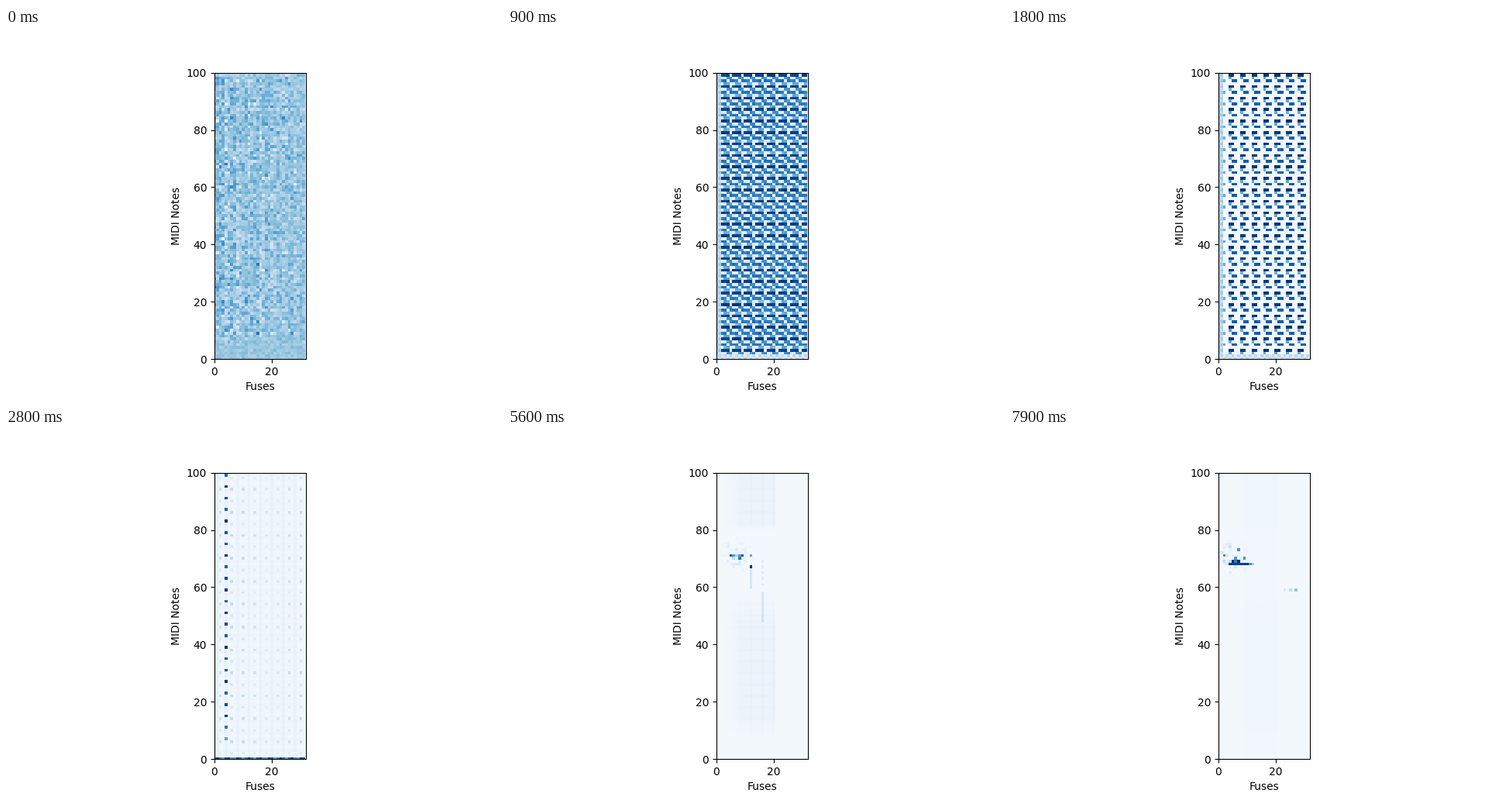
These frames come from a looping animation (640x480 px, 8000 ms). A matplotlib script:

```python
import numpy as np
import matplotlib.pyplot as plt
from matplotlib.animation import FuncAnimation

ROWS, COLS, FRAMES = 100, 32, 80
row, col = np.mgrid[0:ROWS, 0:COLS]
rng = np.random.default_rng(11)
grain = rng.normal(0, 1, (ROWS, COLS))
flecks = rng.uniform(0, 1, (ROWS, COLS))


def dash(r, start, width):
    """Dashes in every fourth row, repeating every four columns."""
    return (row % 4 == r) & ((col - start) % 4 < width)


def soften_edges(g, left):
    """Pale alternating cells along the left and bottom borders."""
    g[:, :2] = left + .06 * np.cos(np.pi * (row + col))[:, :2]
    g[:2] = .2 + .08 * np.cos(np.pi * (row + col))[:2]
    return g


def weave():
    saw = (col % 4 - 1.5) / 1.5
    slope = np.where(row % 4 == 1, .36, .07)
    g = .46 + slope * saw * (1.1 - .01 * col) + .07 * np.cos(np.pi * row)
    g += .15 * dash(3, 2, 1) - .15 * dash(2, 3, 1)
    g[:, :2] = .56
    return g + .03 * grain


def static(base):
    fade = np.clip(row / 10, .4, 1) * (1.1 - .012 * col)
    return .385 + fade * (.3 * (base - .46) + .085 * grain)


def checks():
    g = .12 + .82 * dash(3, 2, 3) + .6 * dash(1, 1, 3)
    g += .5 * dash(2, 0, 2) + .4 * dash(0, 3, 2)
    return soften_edges(g, .3) + .03 * grain


def dashes():
    g = .02 + .95 * dash(3, 0, 2) + .8 * dash(1, 1, 2) + .5 * dash(2, 0, 1)
    g[:, 2:4] *= .6 * (row % 4 != 3)[:, 2:4]
    return soften_edges(g, .3) + .015 * grain


def dots():
    g = .03 + .035 * (col % 4 == 0) + .05 * (col < 2) + .01 * (row % 2)
    lattice = .16 + .06 * np.cos(2 * np.pi * (col - 7) / 24)
    g += lattice * dash(2, 2, 1) * np.where(row % 8 == 6, 1, .5)
    stem = dash(3, 0, 1) & (col == 4) & (row > 4)
    g = np.where(stem, .88 - .4 * np.exp(-(row - 7) / 2) + .1 * np.sin(row), g)
    g[0] = .74 + .22 * np.sin(1.7 * col[0])
    return g


def floor():
    g = np.full((ROWS, COLS), .015)
    g[0] = .78 + .2 * np.sin(1.7 * col[0])
    return g


def haze():
    body = np.clip((col - 2) / 8, 0, 1) * (col <= 20)
    band = np.clip((row - 7) / 8, 0, 1) * np.clip((60 - row) / 14, 0, 1)
    band += np.clip((row - 79) / 4, 0, 1)
    knots = 1 + .35 * (col % 4 == 0) + .3 * (row % 4 == 2)
    return .018 + .04 * band * body * knots


def scatter(r, c, height, width, power):
    """Random cells that thin out away from a centre."""
    reach = ((row - r) / height) ** 2 + ((col - c) / width) ** 2
    return np.exp(-reach) * flecks ** power


def cluster():
    g = .3 * scatter(71, 7, 4, 4, 3)
    g[71, 5:10] = .55 + .25 * np.cos(np.pi * (col[0, 5:10] - 5) / 2)
    g[70, 8] = .7
    g[60:67, 12] = .14
    g[48:59, 16] = .13
    g[61:70:2, 16] = .1
    g[67, 12], g[71, 12] = 1, .5
    return g


def streak():
    g = .5 * scatter(70, 4, 4, 4, 3)
    g[68, 4:13] = .9 * np.clip((13 - col[0, 4:13]) / 3, 0, 1)
    g[69, 5:8] = 1 - .3 * (col[0, 5:8] == 6)
    for r, c in (71, 2), (70, 6), (70, 9), (73, 7):
        g[r, c] = .58
    g[59, 23:28:2] = .1 + .07 * np.arange(0, 5, 2)
    return g


base, bottom, mist = weave(), floor(), haze()
early = mist + .45 * cluster()
early[0] = .55 * bottom[0]
late = .018 + .2 * (mist - .018) + .01 * ((col > 8) & (col < 21))
middle = .5 * (mist + late) + .7 * cluster() + .3 * streak() * (row > 60)
keys = {0: static(base), 5: base, 9: checks(), 18: dashes(), 28: dots(),
        34: bottom, 39: bottom, 48: early, 56: mist + cluster(),
        66: middle, 79: late + streak()}
times = list(keys)


def field(n):
    """Blend neighbouring states, with some flicker in the late bright cells."""
    i = min(np.searchsorted(times, n, side="right") - 1, len(times) - 2)
    a, b = times[i], times[i + 1]
    u = (n - a) / (b - a)
    g = (1 - u) * keys[a] + u * keys[b]
    if n > 40:
        wave = np.sin(np.pi * u) * np.sin(.9 * n + 6 * flecks)
        g = np.where(g > .12, g * (1 + .3 * wave), g)
    return np.clip(g, 0, 1)


fig, ax = plt.subplots(figsize=(6.4, 4.8), dpi=100)
image = ax.imshow(field(0), cmap="Blues", vmin=0, vmax=1, origin="lower")
ax.set(xlim=(0, 32), ylim=(0, 100), xticks=[0, 20], yticks=range(0, 101, 20),
       xlabel="Fuses", ylabel="MIDI Notes")


def update(n):
    image.set_data(field(n))
    return [image]


anim = FuncAnimation(fig, update, frames=FRAMES, interval=100,
                     repeat=True, repeat_delay=0)
plt.show()
```
